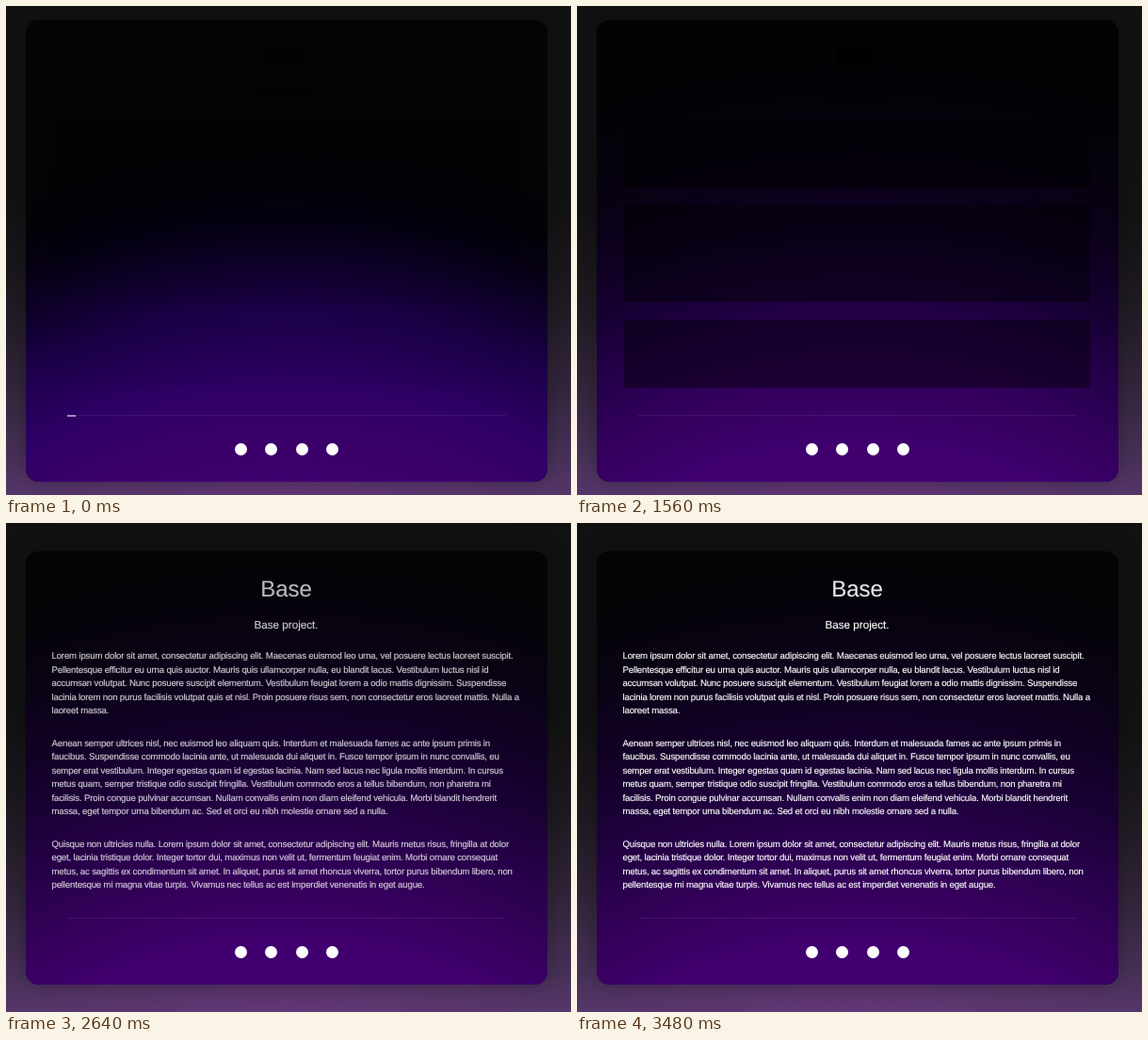
These frames come from a looping animation (600 px wide and 519 px high, 3520 ms). An HTML page:

```html
<!DOCTYPE html>
<html lang="en">
<head>
<meta charset="utf-8">
<title>Base</title>
<style>
  html, body { margin: 0; width: 100%; height: 100%; overflow: hidden; background: #121212; }
  #stage {
    position: relative; width: 600px; height: 519px; overflow: hidden;
    background:
      radial-gradient(ellipse 340px 75px at 50% 100%, rgba(150, 60, 170, .26), transparent),
      linear-gradient(#121112, #131213 42%, #1e1a21 60%, #32253a 77%, #463056 91%, #533667);
  }
  #card, #shade {
    position: absolute; left: 21px; width: 554px; top: 15px; height: 490px; border-radius: 14px;
  }
  #card { overflow: hidden; background: #040305; }
  #shade { box-shadow: 0 0 24px rgba(0, 0, 0, .25); }
  .glow { position: absolute; inset: 0; }
  #low {
    background: radial-gradient(circle at 50% calc(100% + 460px),
      #3e006c 460px, #3c006b 495px, #2e0066 565px, #1d004c 635px,
      #10002e 685px, #060013 735px, #030206 780px, #040305 850px);
  }
  #high {
    background: radial-gradient(circle at 50% calc(100% + 460px),
      #42006e 460px, #410070 500px, #38005f 550px, #29014c 620px,
      #1a0136 690px, #100122 760px, #090312 830px, #040306 900px);
  }
  #bones, #text { position: absolute; inset: 0; }
  #bones i { position: absolute; background: #000; border-radius: 3px; }
  #rule, #bar { position: absolute; left: 44px; }
  #rule { bottom: 70px; width: 466px; height: 1px; background: rgba(180, 140, 205, .13); }
  #bar { bottom: 69.5px; width: 9px; height: 1.6px; background: rgba(225, 210, 240, .65); }
  .dot { position: absolute; bottom: 28.5px; width: 13px; height: 13px; border-radius: 50%; background: #fff; }
  text {
    font-family: "Liberation Sans", Arial, sans-serif; fill: #fff;
    stroke: #fff; stroke-width: .15px; text-rendering: geometricPrecision;
  }
  .title { font-size: 24px; fill: #e8e4ec; stroke: #e8e4ec; text-anchor: middle; }
  .lead { font-size: 11.7px; text-anchor: middle; }
  .body { font-size: 9.67px; letter-spacing: -.019em; }
</style>
</head>
<body>
<div id="stage">
  <div id="shade"></div>
  <div id="card">
    <div class="glow" id="low"></div>
    <div class="glow" id="high"></div>
    <div id="rule"></div>
    <div id="bar"></div>
  </div>
  <div id="bones"></div>
  <svg id="text" width="600" height="519"></svg>
</div>
<script>
const LOOP = 3520, READY = 2400;
const $ = id => document.getElementById(id);

const paragraphs = [
  [144.3, `Lorem ipsum dolor sit amet, consectetur adipiscing elit. Maecenas euismod leo urna, vel posuere lectus laoreet suscipit.
Pellentesque efficitur eu urna quis auctor. Mauris quis ullamcorper nulla, eu blandit lacus. Vestibulum luctus nisl id
accumsan volutpat. Nunc posuere suscipit elementum. Vestibulum feugiat lorem a odio mattis dignissim. Suspendisse
lacinia lorem non purus facilisis volutpat quis et nisl. Proin posuere risus sem, non consectetur eros laoreet mattis. Nulla a
laoreet massa.`],
  [236.7, `Aenean semper ultrices nisl, nec euismod leo aliquam quis. Interdum et malesuada fames ac ante ipsum primis in
faucibus. Suspendisse commodo lacinia ante, ut malesuada dui aliquet in. Fusce tempor ipsum in nunc convallis, eu
semper erat vestibulum. Integer egestas quam id egestas lacinia. Nam sed lacus nec ligula mollis interdum. In cursus
metus quam, semper tristique odio suscipit fringilla. Vestibulum commodo eros a tellus bibendum, non pharetra mi
facilisis. Proin congue pulvinar accumsan. Nullam convallis enim non diam eleifend vehicula. Morbi blandit hendrerit
massa, eget tempor urna bibendum ac. Sed et orci eu nibh molestie ornare sed a nulla.`],
  [343.7, `Quisque non ultricies nulla. Lorem ipsum dolor sit amet, consectetur adipiscing elit. Mauris metus risus, fringilla at dolor
eget, lacinia tristique dolor. Integer tortor dui, maximus non velit ut, fermentum feugiat enim. Morbi ornare consequat
metus, ac sagittis ex condimentum sit amet. In aliquet, purus sit amet rhoncus viverra, tortor purus bibendum libero, non
pellentesque mi magna vitae turpis. Vivamus nec tellus ac est imperdiet venenatis in eget augue.`]
];

function addText(kind, str, x, y) {
  const t = document.createElementNS("http://www.w3.org/2000/svg", "text");
  t.setAttribute("class", kind);
  t.setAttribute("x", x);
  t.setAttribute("y", y);
  t.textContent = str;
  $("text").append(t);
}

addText("title", "Base", 297.5, 78.3);
addText("lead", "Base project.", 297.5, 112);
for (const [y, copy] of paragraphs)
  copy.split("\n").forEach((line, i) => addText("body", line, 48.5, y + i * 14.5));

// Placeholders: left, top, width, height
for (const [l, t, w, h] of [[275, 45, 46, 22], [261, 87, 66, 14], [50, 120, 495, 73], [50, 212, 495, 102], [50, 333, 495, 72]]) {
  const bone = document.createElement("i");
  Object.assign(bone.style, { left: l + "px", top: t + "px", width: w + "px", height: h + "px" });
  $("bones").append(bone);
}

for (const x of [249, 281.5, 314, 346]) {
  const dot = document.createElement("div");
  dot.className = "dot";
  dot.style.left = x - 21 - 6.5 + "px";
  $("card").append(dot);
}

// Each step: [ms, properties, easing to the next step]
function play(id, steps) {
  const frames = steps.map(([ms, props, easing = "linear"]) => ({ ...props, easing, offset: ms / LOOP }));
  $(id).animate(frames, { duration: LOOP, iterations: Infinity });
}

const tall = { top: "15px", height: "490px" }, fitted = { top: "30px", height: "460px" };
for (const id of ["card", "shade"])
  play(id, [[0, tall], [READY, tall], [READY, fitted], [LOOP, fitted]]);

play("high", [[0, { opacity: 0 }], [650, { opacity: .05 }, "ease-in-out"], [2050, { opacity: 1 }], [LOOP, { opacity: 1 }]]);

play("bones", [
  [0, { opacity: .04 }, "ease-in-out"],
  [1140, { opacity: .6 }, "ease-in-out"],
  [2250, { opacity: .02 }],
  [READY, { opacity: .05 }], [READY, { opacity: 0 }], [LOOP, { opacity: 0 }]
]);

play("bar", [
  [0, { width: "9px", opacity: 1 }],
  [720, { width: "200px", opacity: .8 }],
  [1380, { width: "466px", opacity: .75 }],
  [1540, { width: "466px", opacity: 0 }],
  [LOOP, { width: "466px", opacity: 0 }]
]);

play("text", [[0, { opacity: 0 }], [2440, { opacity: 0 }, "ease"], [2840, { opacity: 1 }], [LOOP, { opacity: 1 }]]);
</script>
</body>
</html>
```
